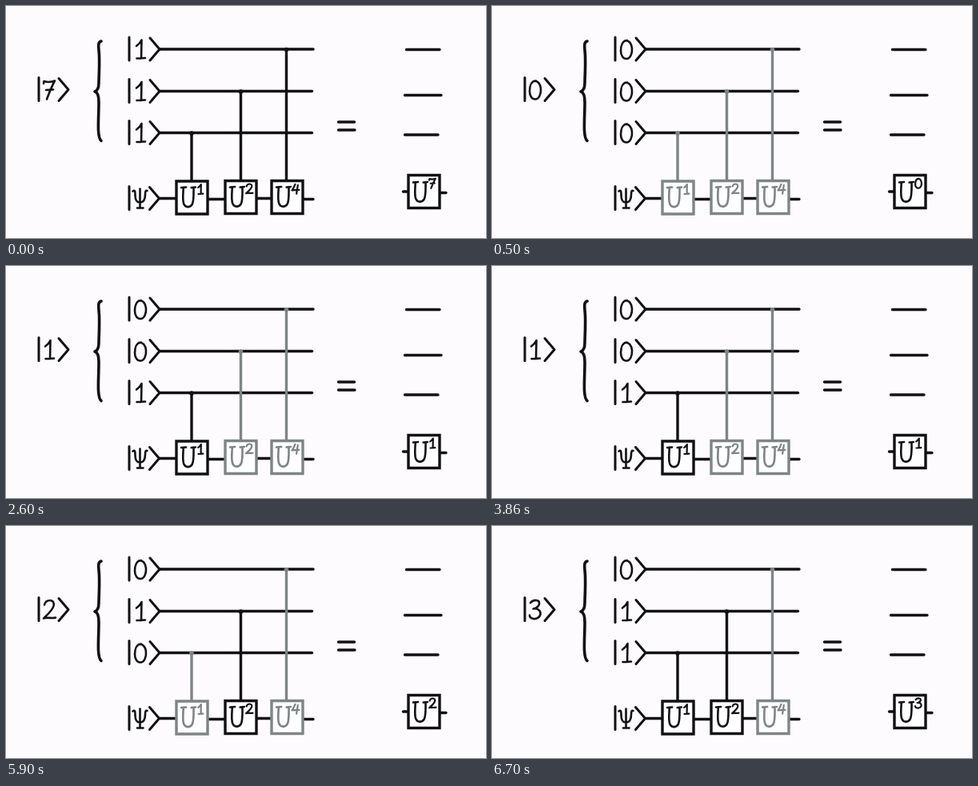
An HTML page for the animation above (8 s loop, 600 by 290 pixels).

```html
<!DOCTYPE html>
<html lang="en">
<head>
<meta charset="utf-8">
<title>Controlled powers of U</title>
<style>
  html, body { margin: 0; width: 100%; height: 100%; overflow: hidden; background: #fdfbfe; }
  svg { display: block; width: 600px; height: 290px; }
  path { fill: none; stroke: currentColor; stroke-linecap: round; stroke-linejoin: round; vector-effect: non-scaling-stroke; }
  circle { fill: currentColor; }
  .box { stroke-linejoin: miter; }
</style>
</head>
<body>
<svg id="stage" viewBox="0 0 600 290" role="img" aria-label="Quantum circuit with controlled powers of U"></svg>
<script>
const INK = '#111114', DIM = '#7d8585', LOOP = 8000;
const STEPS = [[0, 7], [500, 0], [2600, 1], [4700, 2], [6700, 3]];

// Pen strokes, centred on 0,0 and about 24 units tall
const GLYPHS = {
  0: 'M1-11C-5-11-7-4-7 2C-7 8-4 12 0 12C5 12 7.5 5 7-1C6.500-7 3-12-2-10.500',
  1: 'M-5-4C-2-6 0-8 1.500-11.500L1 11.500M-4.500 11.500L6 11',
  2: 'M-6-6C-5-10-2-11.500 1-11.500C5-11.500 6.500-8 5.500-4.500C4 1-3 7-7 11C-3 9 3 11.500 8 10',
  3: 'M-6-8.500C-4-11-1-12 2-11.500C6-11 6-6 3-3.500C1.500-2-1-1-2.500-1C3-2 7 1 6.500 5.500C6 10 1 12-2 11.500C-5 11-7 9-7 7',
  4: 'M-1-11C-3-5-5-1-8 3.500C-3 2.500 3 3 8 2.500M5-9C4-2 3 5 2 12',
  7: 'M-7-7.500L-6.500-10.500C-2-9 3-9.500 7-11C3-4 0 4-3 12M-4 .5L5 0',
  U: 'M-8.500-12L-2-12.500M-5.500-12C-6-4-7 4-5 8.500C-3 13 3 13.500 6 9C8.500 5 8-4 8-12M5-12L10.500-12.500',
  psi: 'M-9-9C-6-11-6-8-6-4C-6 3-4 5 0 5C5 5 6.500 0 6.500-5C6.500-9 7-10 9-9.500M0-12L0 12M-3.500 12L4 12'
};
const stage = document.getElementById('stage');

function add(tag, attrs, parent = stage) {
  const el = document.createElementNS('http://www.w3.org/2000/svg', tag);
  for (const k in attrs) el.setAttribute(k, attrs[k]);
  parent.append(el);
  return el;
}
const line = (d, width = 3.4, parent = stage) => add('path', { d, 'stroke-width': width }, parent);

function glyph(name, x, y, sx, sy, width, parent = stage) {
  const el = line(GLYPHS[name], width, parent);
  el.setAttribute('transform', `translate(${x} ${y}) scale(${sx} ${sy})`);
  return el;
}

function ket(name, bar, mid, tip, y) {
  line(`M${bar} ${y - 15}V${y + 14}`, 3);
  line(`M${tip - 12} ${y - 14}L${tip} ${y}L${tip - 12} ${y + 14}`, 3);
  return glyph(name, mid, y, 1, 1, 2.6);
}

function unitary(power, x, y, parent, uy = 20) {
  add('path', { class: 'box', d: `M${x} ${y}h39v41h-39z`, 'stroke-width': 3.4, style: 'fill:#fefdff' }, parent);
  glyph('U', x + 14, y + uy, 0.94, 1, 2.6, parent);
  return glyph(power, x + 30, y + 10, 0.56, 0.52, 2.2, parent);
}

stage.style.color = INK;

const total = ket(7, 41, 54, 78, 104.5);
line('M119 44C114 45 116 52 116.500 62C117 78 116 88 116 96C116 103 114 106 111 107C115 108 116 113 116 120C116 135 115 145 115.500 156C116 164 117 167 119 168.500', 3.6);

const rows = [158.5, 106.5, 54];
const bits = rows.map(y => {
  line(`M192 ${y}H${y < 60 ? 384 : 382.5}`);
  return ket(1, 154, 168, 192, y);
});
ket('psi', 154, 167.5, 191.5, 240.5);
line('M192 240.500H213M252 241.500H274M312 240.500H332M372 241.500H384');

const gates = [[213, 219, 232], [274, 218.5, 293.5], [332, 218.5, 350.5]].map(([x, y, cx], i) => {
  const g = add('g', {});
  line(`M${cx} ${rows[i]}V${y}`, 3.4, g);
  add('circle', { cx, cy: rows[i] + 0.5, r: 2.8 }, g);
  unitary(2 ** i, x, y, g);
  return g;
});

line('M415.500 145H435.500M415.500 155H436');
line('M500.500 54.500H542M498.500 111.500H544M498.500 161H540');
line('M496.500 232H503M542 233.500H550');
const power = unitary(7, 503, 211.5, stage, 21);

let shown = -1;
function draw() {
  const t = performance.now() % LOOP;
  const n = STEPS.filter(s => s[0] <= t).pop()[1];
  if (n !== shown) {
    shown = n;
    total.setAttribute('d', GLYPHS[n]);
    power.setAttribute('d', GLYPHS[n]);
    bits.forEach((bit, i) => {
      const on = n >> i & 1;
      bit.setAttribute('d', GLYPHS[on]);
      gates[i].style.color = on ? INK : DIM;
    });
  }
  requestAnimationFrame(draw);
}
draw();
</script>
</body>
</html>
```
